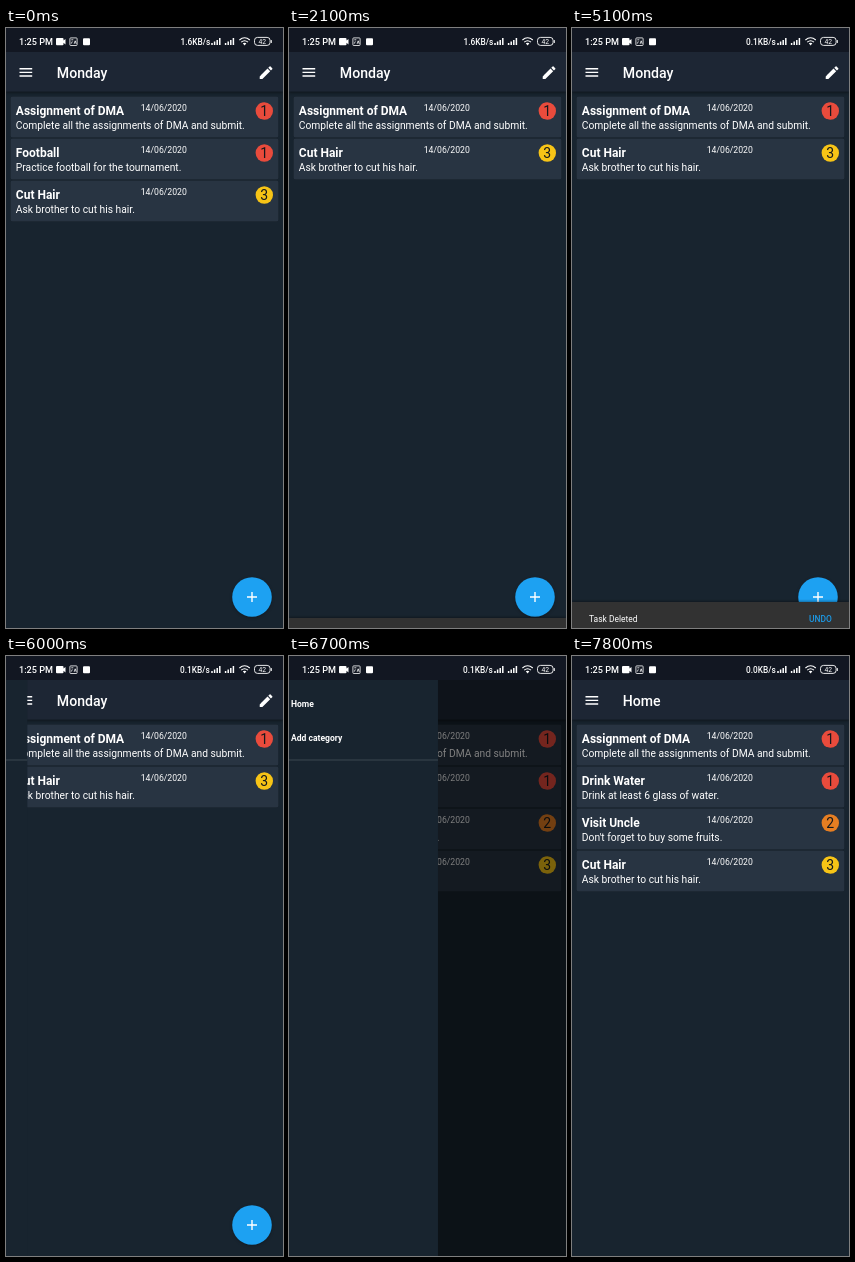
An HTML page for the animation above (8000 ms loop, 277 by 600 pixels).

```html
<!DOCTYPE html>
<html lang="en">
<head>
<meta charset="utf-8">
<title>Task list</title>
<style>
@property --open { syntax: "<number>"; inherits: true; initial-value: 0; }

html, body { margin: 0; width: 100%; height: 100%; overflow: hidden; background: #18242f; }
svg { display: block; width: 277px; height: 600px; font-family: Roboto, sans-serif; fill: #fff; }

.bar { fill: #1d2634; }
.status { fill: #121722; }
.card { fill: #283442; filter: drop-shadow(0 .7px .7px #0006); }
.heading { font-size: 14.1px; font-weight: 500; }
.name { font-size: 12px; font-weight: 700; }
.note { font-size: 10.27px; }
.date { font-size: 8.68px; }
.rank { font-size: 14px; fill: #15181c; text-anchor: middle; }
.fab { fill: #1da1f2; filter: drop-shadow(0 1px 1.5px #0004); }
.small { font-size: 8.46px; }
.entry { font-size: 8.55px; font-weight: 700; }
.clock { font-size: 9.1px; font-weight: 500; }
.speed { font-size: 8.3px; font-weight: 500; }
.line { fill: none; stroke: #fff; }

/* every change is a hard step on a 100 ms grid */
svg, .swipe, .rise, .snack, .monday, .home, .speed { animation: 8s step-end infinite; }
svg { animation-name: open; }
.swipe { animation-name: swipe; }
.rise { animation-name: rise; }
.snack { animation-name: snack; }
.monday { animation-name: monday; }
.home { animation-name: home; }
.s1 { animation-name: s1; }
.s2 { animation-name: s2; }
.s3 { animation-name: s3; }

.scrim { fill: #000; opacity: calc(.62 * (var(--open) - .135)); }
.drawer { transform: translateX(calc((var(--open) - 1) * 158px)); }

@keyframes swipe {
  0% { transform: translateX(0); }
  20% { transform: translateX(16px); }
  21.25% { transform: translateX(69.6px); }
  22.5% { transform: translateX(185px); }
  23.75%, 100% { transform: translateX(290px); }
}
@keyframes rise {
  0% { transform: translateY(0); }
  25% { transform: translateY(-22px); }
  26.25%, 100% { transform: translateY(-42px); }
}
@keyframes snack {
  0% { transform: translateY(38px); }
  26.25% { transform: translateY(24px); }
  27.5% { transform: translateY(6px); }
  28.75% { transform: translateY(0); }
  63.75% { transform: translateY(8px); }
  65% { transform: translateY(24px); }
  66.25%, 100% { transform: translateY(38px); }
}
@keyframes open {
  0% { --open: 0; }
  75% { --open: .135; }
  76.25% { --open: .39; }
  77.5% { --open: .64; }
  78.75% { --open: .83; }
  80% { --open: .95; }
  81.25% { --open: 1; }
  83.75% { --open: .943; }
  85% { --open: .78; }
  86.25% { --open: .54; }
  87.5% { --open: .3; }
  88.75% { --open: .12; }
  90% { --open: .02; }
  91.25%, 100% { --open: 0; }
}
@keyframes monday {
  0% { visibility: visible; }
  83.75%, 100% { visibility: hidden; }
}
@keyframes home {
  0% { visibility: hidden; }
  83.75%, 100% { visibility: visible; }
}
@keyframes s1 {
  0% { visibility: visible; }
  47.5%, 100% { visibility: hidden; }
}
@keyframes s2 {
  0% { visibility: hidden; }
  47.5% { visibility: visible; }
  96.25%, 100% { visibility: hidden; }
}
@keyframes s3 {
  0% { visibility: hidden; }
  96.25%, 100% { visibility: visible; }
}
</style>
</head>
<body>
<svg viewBox="0 0 277 600">
  <clipPath id="list"><rect y="64" width="272.6" height="536"/></clipPath>
  <rect width="277" height="600" fill="#18242f"/>
  <rect class="bar" y="24" width="277" height="39.6" style="filter: drop-shadow(0 1px 1.5px #0007)"/>
  <path class="line" stroke-width="1.4" d="M13.5 40.8h12.7M13.5 44.4h12.7M13.5 48h12.7"/>

  <g class="monday">
    <text class="heading" x="50.8" y="50">Monday</text>
    <path transform="translate(251.6 36.2) scale(.706)" d="M3 17.25V21h3.75L17.81 9.94l-3.75-3.75zM20.71 7.04a1 1 0 0 0 0-1.41l-2.34-2.34a1 1 0 0 0-1.41 0l-1.83 1.83 3.75 3.75z"/>
    <g id="mondayRows" clip-path="url(#list)"></g>
    <circle class="fab" cx="246" cy="569" r="19.8"/>
    <path class="line" stroke-width="1.4" d="M241 569h10M246 564v10"/>
  </g>

  <g class="home">
    <text class="heading" x="50.8" y="50">Home</text>
    <g id="homeRows" clip-path="url(#list)"></g>
  </g>

  <g class="snack">
    <rect y="566" width="277" height="36" fill="#323232" style="filter: drop-shadow(0 -1px 1px #0005)"/>
    <text class="small" x="17" y="586.3">Task Deleted</text>
    <text class="small" x="237" y="586.3" font-weight="500" fill="#1c97e2">UNDO</text>
  </g>

  <rect class="scrim" width="277" height="600"/>
  <g class="drawer">
    <rect y="24" width="158" height="576" fill="#18242f"/>
    <text class="entry" x="11" y="51">Home</text>
    <text class="entry" x="11" y="84.7">Add category</text>
    <rect y="103.5" width="158" height="1" fill="#3a4651"/>
  </g>

  <g>
    <rect class="status" width="277" height="24"/>
    <text class="clock" x="13" y="16.8">1:25 PM</text>
    <path d="M51 10h5.5a1 1 0 0 1 1 1v1.6l2-1.6v5.4l-2-1.6v1.4a1 1 0 0 1-1 1H51a1 1 0 0 1-1-1v-5.2a1 1 0 0 1 1-1z"/>
    <rect class="line" x="63.9" y="9.9" width="7.2" height="7.6" rx=".8" stroke-width=".8"/>
    <path class="line" stroke-width=".8" d="M65.3 11.8h2M66.3 13.4l-1 2.2M68.2 15.8l1-3 1 3"/>
    <rect x="77" y="10.3" width="7" height="7" rx="1"/>
    <text class="speed s1" x="174.5" y="16.8">1.6KB/s</text>
    <text class="speed s2" x="174" y="16.8">0.1KB/s</text>
    <text class="speed s3" x="174" y="16.8">0.0KB/s</text>
    <path id="signal" class="line" stroke-width="1.5" d="M206 17v-2M208.6 17v-3.4M211.2 17v-5M213.8 17v-7"/>
    <use href="#signal" x="13.6"/>
    <path class="line" stroke-width="1.1" d="M233.4 12q5.2-4.4 10.4 0M235.2 14.1q3.4-2.8 6.8 0"/>
    <path d="M236.8 15.3q1.8-1.2 3.6 0l-1.8 2.2z"/>
    <rect class="line" x="248.5" y="9.4" width="15.6" height="8" rx="3" stroke-width=".9"/>
    <rect x="264.8" y="11.9" width="1" height="3" rx=".5"/>
    <text x="256.3" y="15.9" font-size="6.8" text-anchor="middle">42</text>
  </g>
</svg>
<script>
const pitch = 42;
const colors = { 1: "#e94b3c", 2: "#e67e22", 3: "#f7c416" };

const row = ([name, note, rank, motion = ""], i) => `
  <g transform="translate(0 ${68 + i * pitch})"><g class="${motion}">
    <rect class="card" x="4.5" y=".4" width="268" height="41" rx="2"/>
    <text class="name" x="9.8" y="19">${name}</text>
    <text class="date" x="134.7" y="15">14/06/2020</text>
    <text class="note" x="9.8" y="33">${note}</text>
    <circle cx="258.3" cy="15" r="8.7" fill="${colors[rank]}"/>
    <text class="rank" x="258.3" y="20">${rank}</text>
  </g></g>`;

const dma = ["Assignment of DMA", "Complete all the assignments of DMA and submit.", 1];
const hair = ["Cut Hair", "Ask brother to cut his hair.", 3];

const fill = (id, tasks) => {
  document.getElementById(id).innerHTML = tasks.map(row).join("");
};

fill("mondayRows", [
  dma,
  ["Football", "Practice football for the tournament.", 1, "swipe"],
  [...hair, "rise"],
]);
fill("homeRows", [
  dma,
  ["Drink Water", "Drink at least 6 glass of water.", 1],
  ["Visit Uncle", "Don't forget to buy some fruits.", 2],
  hair,
]);
</script>
</body>
</html>
```
